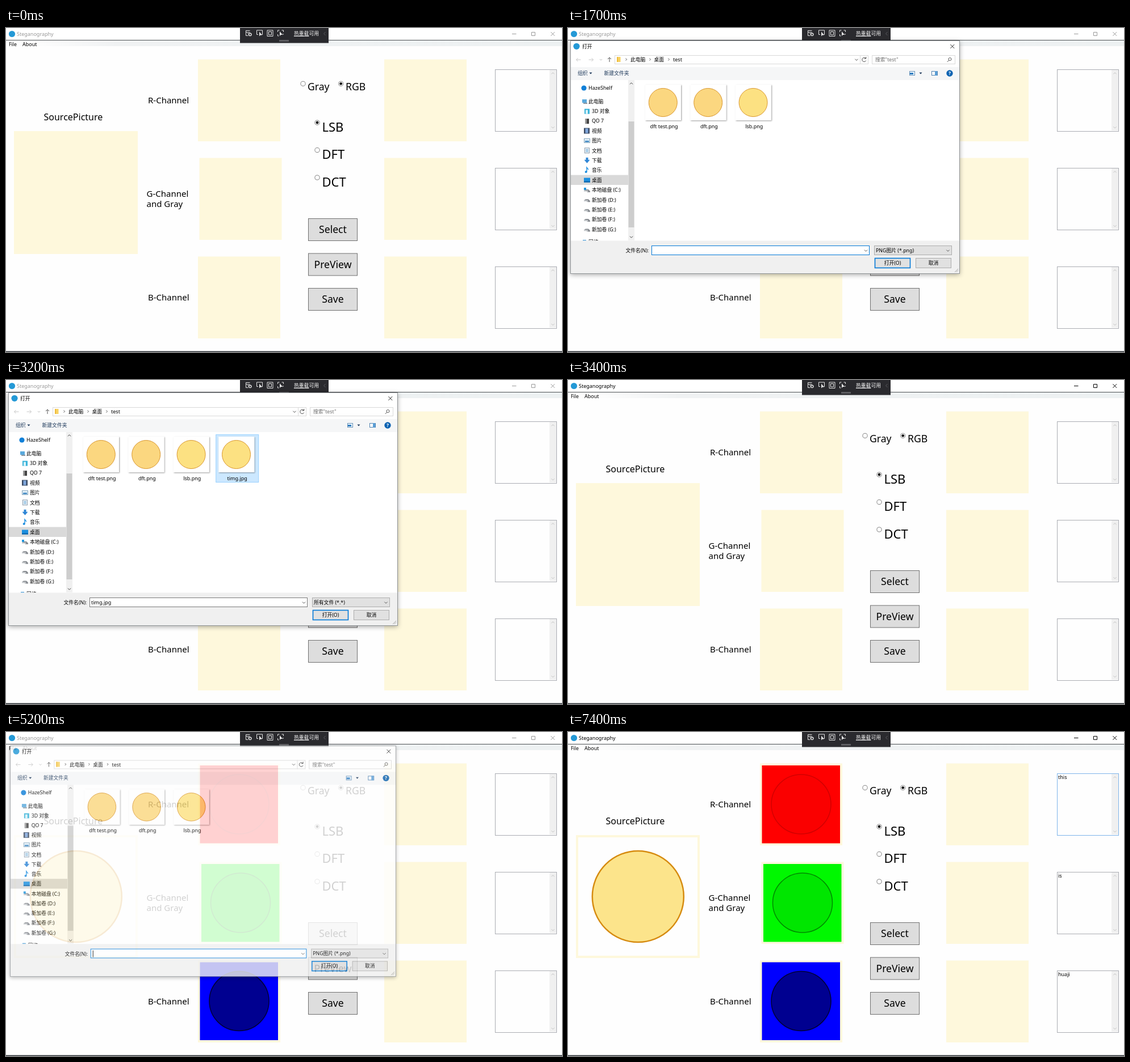
Animation of 979 by 572 pixels, one loop 8 s. Source, as an HTML page:

```html
<!DOCTYPE html>
<html lang="zh-CN">
<head>
<meta charset="utf-8">
<title>Steganography</title>
<style>
  html, body { margin: 0; width: 100%; height: 100%; overflow: hidden; background: #fefefe; }
  svg { display: block; width: 979px; height: 572px; font-family: "Noto Sans", "Noto Sans CJK SC", sans-serif; }
  #dlg { transform-origin: 346.5px 227.5px; }
</style>
</head>
<body>
<svg id="stage" viewBox="0 0 979 572" xmlns="http://www.w3.org/2000/svg"></svg>
<script>
const rect = (x, y, w, h, fill, extra = '') =>
  `<rect x="${x}" y="${y}" width="${w}" height="${h}" fill="${fill}" ${extra}/>`;
// Outlined box on crisp pixel edges
const box = (x, y, w, h, fill, stroke, extra = '') =>
  rect(x + .5, y + .5, w - 1, h - 1, fill, `stroke="${stroke}" ${extra}`);
const circle = (x, y, r, fill, extra = '') =>
  `<circle cx="${x}" cy="${y}" r="${r}" fill="${fill}" ${extra}/>`;
const text = (x, y, size, s, fill = '#000', extra = '') =>
  `<text x="${x}" y="${y}" font-size="${size}" fill="${fill}" ${extra}>${s}</text>`;
const line = (d, stroke, w = 1, extra = '') =>
  `<path d="${d}" fill="none" stroke="${stroke}" stroke-width="${w}" ${extra}/>`;
const mid = 'text-anchor="middle"';
const chevron = (x, y, dir, c, s = 2.6) => {
  const h = s / 2;
  const d = {
    up: `M${x - s} ${y + h}l${s} ${-s} ${s} ${s}`,
    down: `M${x - s} ${y - h}l${s} ${s} ${s} ${-s}`,
    right: `M${x - h} ${y - s}l${s} ${s} ${-s} ${s}`,
    left: `M${x + h} ${y - s}l${-s} ${s} ${s} ${s}`
  }[dir];
  return line(d, c, 1);
};
const cross = (x, y, s) => `M${x - s} ${y - s}l${2 * s} ${2 * s}m0 ${-2 * s}l${-2 * s} ${2 * s}`;
const group = (id, body, extra = '') => `<g id="${id}" ${extra}>${body}</g>`;

const BLUE = '#0078d7', CREAM = '#fef8dc', INK = '#1e395b';

function toolbar() {
  const c = '#e6e6e6';
  return rect(412, 0, 156, 26.5, '#2a2a2e') +
    line('M422.5 4.5h7m-7 0v9h4m-4-6h7M425 10h3', c) +
    circle(429.8, 11.4, 2.2, 'none', `stroke="${c}" stroke-width="1.4"`) +
    line('M444 11.5h-2.500v-7.500h10v7.500h-2', c) +
    `<path d="M446 6.500v8l2-2h3z" fill="${c}"/>` +
    line('M460 4h10v10.500h-10zM462.500 6.500h5v5.500h-5z', c) +
    line('M478.500 7v-3h3m4 0h3v3m-10 4v3h2m6-3h2.500', c) +
    `<path d="M482 6v8l2-2h3z" fill="${c}"/>` +
    text(507, 13, 8.8, '<tspan text-decoration="underline">热重载</tspan>可用', '#fff') +
    chevron(561, 10, 'left', '#5a5a60', 3) + rect(481, 21, 17, 3, '#5d5d61');
}

function titleBar() {
  return rect(0, 0, 979, 21, '#fff') + rect(0, 21, 979, 1, '#4b4f52') +
    rect(0, 22, 979, 10, 'url(#strip)') + rect(0, 570.5, 979, 1.5, '#30353b') +
    circle(10.5, 10.5, 5.6, '#2499d6') +
    group('title', text(19, 14, 9, 'Steganography', 'currentColor') +
      line(`M891 10.500h7.500M925.500 7.500h6v6h-6z${cross(962.8, 10.5, 3.4)}`, 'currentColor')) +
    text(5, 31.8, 8.8, 'File') + text(29, 31.8, 9, 'About');
}

const radio = (x, y, on) => circle(x, y, 4.1, '#fff', 'stroke="#777" stroke-width=".9"') +
  (on ? circle(x, y, 2.4, '#111') : '');

const button = (id, y, label) =>
  box(532, y, 87, 40, '#ddd', '#707070', `id="${id}"`) + text(575.5, y + 26.4, 17.6, label, '#000', mid);

const memo = (i, word) => {
  const y = 73 + 174 * i;
  return rect(957, y + 1, 12, 107, '#f0f0f0') +
    chevron(963, y + 7, 'up', '#c3c3c3') + chevron(963, y + 102.5, 'down', '#c3c3c3') +
    box(861, y, 109, 110, 'none', '#abadb3', `id="memo${i}"`) +
    text(863, y + 9.6, 9, word, '#000', 'class="word"');
};

const channel = (x, y, back, fill, stroke) => rect(x, y, 137.5, 137.5, back) +
  circle(x + 69, y + 68.5, 52.5, fill, `stroke="${stroke}" stroke-width="1.5"`);

function mainWindow() {
  const frames = [55, 229, 403].map((y, i) =>
    rect(i === 1 ? 340.5 : 338, y + .5, 145, 144.5, CREAM) + rect(666, y + .5, 145, 144.5, CREAM));
  return titleBar() + rect(14, 182, 218, 217, CREAM) + frames.join('') +
    group('pics', rect(18, 186, 210, 209, '#fefefe') +
      circle(123.3, 290.5, 80.5, '#fce48b', 'stroke="#d68b10" stroke-width="2.5"') +
      channel(341.5, 59, '#f00', '#fa0000', '#d20000') +
      channel(344, 233, '#00f800', '#00e600', '#008a00') +
      channel(341.5, 406.5, '#00f', '#000090', '#000038')) +
    text(66.5, 163, 16, 'SourcePicture') + text(250, 133, 15, 'R-Channel') +
    text(247.5, 297.500, 15, 'G-Channel') + text(247.5, 316, 15, 'and Gray') +
    text(250, 480.500, 15, 'B-Channel') +
    radio(523, 98.3) + text(531, 110, 17.6, 'Gray') +
    radio(589.7, 98.3, true) + text(598, 110, 17.6, 'RGB') +
    ['LSB', 'DFT', 'DCT'].map((s, i) => radio(548, 167 + 48.5 * i, i === 0) +
      text(556.5, 182.8 + 48.600 * i, 22, s)).join('') +
    button('select', 336, 'Select') + button('preview', 397.5, 'PreView') + button('save', 459, 'Save') +
    ['this', 'is', 'huaji'].map((s, i) => memo(i, s)).join('');
}

function sidebar() {
  const names = ['3D 对象', 'QO 7', '视频', '图片', '文档', '下载', '音乐', '桌面',
    '本地磁盘 (C:)', '新加卷 (D:)', '新加卷 (E:)', '新加卷 (F:)', '新加卷 (G:)'];
  const icon = (i, y) => {
    if (i >= 8) return `<path d="M28 ${y + 1}l3-2h5l3 3v2h-4z" fill="#8b8f94"/>` +
      rect(28, y + 1, 7, 2, '#d0d3d6') + (i === 8 ? rect(28, y - 4, 4, 4, '#2196dd') : '');
    return [
      () => rect(29, y - 4, 9, 9, '#39b3d9') + rect(31, y - 2, 4, 7, '#d6f1f8'),
      () => rect(30, y - 4, 7, 9, '#444') + rect(30, y - 4, 3, 9, '#9a9a9a'),
      () => rect(28, y - 5, 10, 10, '#3b4a63') + rect(30.5, y - 4, 5, 8, '#7fa6dc'),
      () => box(28, y - 4, 11, 8, '#e9f4fb', '#7da0b8') + rect(30, y, 7, 2.500, '#3a84c0'),
      () => box(29, y - 5, 9, 10, '#fff', '#8296a8') + line(`M31 ${y - 2}h5m-5 2h5m-5 2h5`, '#5b9fd0'),
      () => `<path d="M31.500 ${y - 5}h4v4h3l-5 6-5-6h3z" fill="#2f86d6"/>`,
      () => line(`M33 ${y + 3}v-8l3 4`, '#1f8fe0', 1.4) + circle(31.7, y + 3, 2, '#1f8fe0'),
      () => rect(28, y - 4, 11, 8, '#1b8fdf') + rect(28, y + 2, 11, 2, '#0b62a8')
    ][i]();
  };
  const rows = names.map((s, i) => {
    const y = 146.7 + 17.400 * i;
    return icon(i, y) + text(42, y + 3.3, 8.8, s);
  });
  return rect(5, 259.5, 101, 17.500, '#d9d9d9') +
    circle(28, 106, 4.600, '#1180d8') + text(36, 109.3, 9, 'HazeShelf') +
    rect(25, 126, 8, 6, '#5aa9dc') + rect(27, 132, 7, 2, '#8a98a4') + text(36, 132.7, 8.8, '此电脑') +
    rows.join('') +
    `<g clip-path="url(#navclip)">${rect(26, 374, 6, 4, '#4d9fd8')}${text(36, 381, 8.8, '网络')}</g>` +
    rect(106, 92, 11, 283, '#f0f0f0') + rect(106.5, 165, 10, 187, '#cdcdcd') +
    chevron(111.5, 98, 'up', '#444') + chevron(111.5, 369, 'down', '#444');
}

const tile = (i, name, fill) => {
  const x = 131 + 79.4 * i;
  return group('file' + i, box(x, 96, 76, 85, 'none', 'none', `id="tile${i}"`) +
    rect(x + 5, 100, 63, 63, '#fff', 'filter="url(#soft)"') +
    circle(x + 36.3, 131.5, 25, fill, 'stroke="#d9962e" stroke-width="1"') +
    text(x + 38, 176.700, 9, name, '#000', mid));
};

function dialog() {
  const head = circle(15, 32.3, 5.6, '#2499d6') + text(25, 36, 8.8, '打开') +
    line(cross(676.8, 32.5, 3.400), '#222') +
    line('M22.500 56h-8m3-3l-3 3 3 3M36.500 56h8m-3-3l3 3-3 3', '#c8c8c8') +
    chevron(58, 56, 'down', '#c0c0c0', 2) + line('M73 60v-8m-3 3l3-3 3 3', '#555') +
    box(82, 48, 447, 16, '#fff', '#d9d9d9') + line('M514.500 48v16', '#d9d9d9') +
    rect(86, 51, 6.500, 9, '#f7d264') + rect(86, 51, 2, 9, '#eebb3a') +
    [102.5, 144.5, 177.5].map(x => chevron(x, 55.500, 'right', '#555', 2)).join('') +
    text(110, 59, 8.8, '此电脑') + text(151.5, 59, 8.8, '桌面') + text(185, 59, 9, 'test') +
    chevron(508, 56, 'down', '#555') +
    line('M524.500 54a3.600 3.600 0 1 0 .2 3.500M524.700 51v3h-3', '#444') +
    box(535, 48, 147, 16, '#fff', '#d9d9d9') + text(541, 59, 8.8, '搜索"test"', '#6d6d6d') +
    circle(672.5, 55, 2.5, 'none', 'stroke="#555"') + line('M670.700 57l-3 3', '#555');
  const bar = rect(5, 69, 684, 23, '#f5f6f7') + text(17, 83.2, 8.8, '组织', INK) +
    `<path d="M37.500 78.500h5l-2.500 3z M618.500 78.500h5l-2.500 3z" fill="${INK}"/>` +
    text(63.5, 83.2, 8.8, '新建文件夹', INK) +
    box(601, 76, 10, 8, '#eaf4fb', '#6a93b8') + rect(602, 79, 6, 3, '#2d7cc0') +
    box(640, 76, 11, 8, '#fff', '#4f81b0') + rect(646, 76, 4, 8, '#5c9fd6') +
    circle(672, 80, 5.700, '#0c63b2') + text(672, 83.2, 8.6, '?', '#fff', mid + ' font-weight="700"');
  const files = tile(0, 'dft test.png', '#fbd780') + tile(1, 'dft.png', '#fbd780') +
    tile(2, 'lsb.png', '#fce182') + tile(3, 'timg.jpg', '#fce182');
  const foot = rect(5, 375.5, 684, 57, '#f0f0f0') + text(101.5, 396.2, 8.800, '文件名(N):') +
    box(147, 384, 384, 17, '#fff', BLUE, 'id="input"') + text(150, 396, 9, '', '#000', 'id="name"') +
    rect(151, 387, 1, 12, '#000', 'id="caret"') + chevron(524.5, 393, 'down', '#555') +
    box(539, 384, 137, 17, '#e1e1e1', '#adadad', 'id="combo"') +
    text(542, 396, 8.800, '', '#000', 'id="filter"') + chevron(669, 393, 'down', '#555') +
    box(540, 406, 63, 18, '#e1e1e1', BLUE, 'stroke-width="1.6"') + text(571.5, 418, 8.8, '打开(O)', '#000', mid) +
    box(612, 406, 63, 18, '#e1e1e1', '#adadad') + text(643.5, 418, 8.800, '取消', '#000', mid) +
    line('M681 431l6-6m-3.500 6l3.500-3.500', '#aaa');
  const list = group('list', box(539, 401, 137, 36, '#fff', BLUE) +
    rect(540, 402, 135, 17, BLUE, 'id="pick"') +
    text(542, 413.500, 8.8, PNG, '#fff', 'id="opt0"') + text(542, 430.500, 8.8, ALL, '#000', 'id="opt1"'));
  return rect(4, 22, 685.5, 411.5, '#fff', 'filter="url(#shadow)"') +
    head + bar + sidebar() + files + foot + box(4, 22, 686, 412, 'none', '#8f9396') + list;
}

const PNG = 'PNG图片 (*.png)', ALL = '所有文件 (*.*)';
document.getElementById('stage').innerHTML = `<defs>
  <linearGradient id="strip"><stop offset=".05" stop-color="#fdfdfd"/><stop offset=".2" stop-color="#f0f2f3"/>
    <stop offset="1" stop-color="#edf1f2"/></linearGradient>
  <filter id="soft"><feDropShadow dx="1" dy="1" stdDeviation="1" flood-opacity=".4"/></filter>
  <filter id="shadow"><feDropShadow dx="0" dy="2" stdDeviation="4" flood-opacity=".35"/></filter>
  <clipPath id="navclip"><rect x="5" y="373" width="101" height="2.5"/></clipPath></defs>` +
  rect(0, 0, 979, 572, '#fefefe') + mainWindow() + toolbar() + group('dlg', dialog());

// State changes: [time in ms, values that change]
const idle = { active: 0, btn: 0, memo: 0, pics: 0, words: 0, alpha: 0, scale: 1, focus: 1, caret: 1,
  name: '', all: 0, combo: 0, list: -1, hover: -1, sel: -1 };
const open = t => [
  [t, { alpha: .35, scale: .965, active: 0, btn: 0, focus: 1, caret: 1, name: '', all: 0, hover: -1, sel: -1 }],
  [t + 100, { alpha: .82, scale: .991 }], [t + 200, { alpha: .97, scale: .998 }], [t + 300, { alpha: 1, scale: 1 }]];
const close = t => [[t, { alpha: .4, scale: .97, active: 1 }], [t + 100, { alpha: 0 }]];
const steps = [
  [300, { btn: 1 }], [900, { active: 1, btn: 2 }], [1000, { btn: 1 }],
  ...open(1100), [1700, { caret: 0 }],
  [2100, { focus: 0, combo: 1 }], [2300, { list: 0 }], [2500, { list: 1 }],
  [2700, { list: -1, all: 1 }], [3000, { combo: 0, hover: 3 }],
  [3200, { sel: 3, name: 'timg.jpg' }], ...close(3300),
  [4100, { pics: 1 }], [4700, { btn: 1 }], [5000, { btn: 2 }],
  ...open(5100), [5600, { hover: 0 }], [5700, { hover: 2, caret: 0 }],
  [6000, { sel: 2, name: 'lsb.png' }], ...close(6500),
  [6700, { words: 1 }], [7400, { memo: 1 }]
];

const $ = id => document.getElementById(id);
const paint = (id, fill, stroke) => { $(id).setAttribute('fill', fill); $(id).setAttribute('stroke', stroke); };
const show = (el, on) => { el.style.display = on ? '' : 'none'; };
const words = document.querySelectorAll('.word');

function draw(s) {
  $('title').style.color = s.active ? '#000' : '#999';
  paint('select', ...[['#ddd', '#707070'], ['#bee6fd', '#3c7fb1'], ['#c4e5f6', '#2c628b']][s.btn]);
  $('memo0').setAttribute('stroke', s.memo ? '#7eb4ea' : '#abadb3');
  show($('pics'), s.pics);
  words.forEach(w => show(w, s.words));
  show($('dlg'), s.alpha);
  $('dlg').style.opacity = s.alpha;
  $('dlg').style.transform = `scale(${s.scale})`;
  paint('input', '#fff', s.focus ? BLUE : '#7a7a7a');
  show($('caret'), s.focus && s.caret && !s.name);
  $('name').textContent = s.name;
  $('filter').textContent = s.all ? ALL : PNG;
  paint('combo', ...(s.combo ? ['#e5f1fb', BLUE] : ['#e1e1e1', '#adadad']));
  show($('list'), s.list >= 0);
  $('pick').setAttribute('y', 402 + 17 * Math.max(s.list, 0));
  for (let i = 0; i < 2; i++) $('opt' + i).setAttribute('fill', s.list === i ? '#fff' : '#000');
  show($('file3'), s.all);
  for (let i = 0; i < 4; i++)
    paint('tile' + i, ...(s.sel === i ? ['#cce8ff', '#99d1ff'] : s.hover === i ? ['#e5f3ff', '#e5f3ff'] : ['none', 'none']));
}

const start = performance.now();
let last = -1;
function tick() {
  const t = (performance.now() - start) % 8000;
  const past = steps.filter(([at]) => at <= t);
  if (past.length !== last) {
    last = past.length;
    draw(Object.assign({}, idle, ...past.map(p => p[1])));
  }
  requestAnimationFrame(tick);
}
tick();
</script>
</body>
</html>
```
